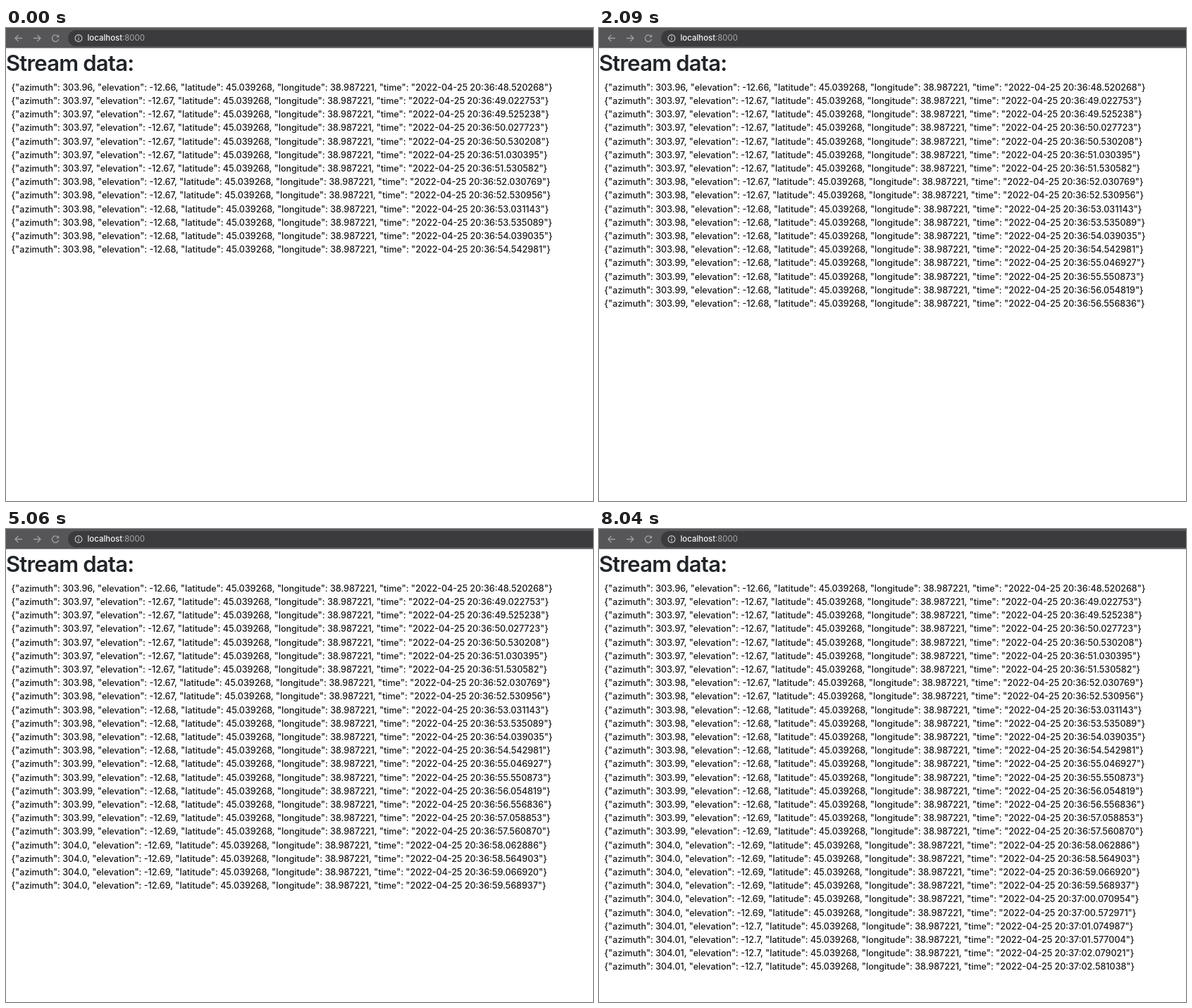
Recreate the animation shown at these times as an HTML page. Size 833 by 672 pixels, loop 9.24 s.

```html
<!DOCTYPE html>
<html lang="en">
<head>
<meta charset="utf-8">
<title>Stream data</title>
<style>
  html, body { margin: 0; width: 100%; height: 100%; overflow: hidden; background: #fff; }
  svg { display: block; font-family: Inter, Roboto, sans-serif; font-optical-sizing: none; }
  .icon { fill: none; stroke: #a09fa2; stroke-width: 1.3; }
  .url { font-size: 11.4px; font-weight: 500; fill: #f4f4f5; }
  .port { font-weight: 400; fill: #a9a8ab; }
  .heading { font-size: 31px; font-weight: 600; letter-spacing: -0.8px; fill: #212529; }
  #rows { font-size: 12.52px; font-weight: 500; fill: #18191c; }
</style>
</head>
<body>
<svg width="833" height="672" viewBox="0 0 833 672">
  <rect width="833" height="28.5" fill="#565558"/>
  <rect x="88" y="3" width="780" height="23" rx="11.5" fill="#3b3a3d"/>
  <g class="icon">
    <path d="M23 14.5H13M17.5 10L13 14.5L17.5 19"/>
    <path d="M39 14.5H49M44.5 10L49 14.5L44.5 19"/>
    <path d="M73.6 11.4A4.7 4.7 0 1 0 74.7 15.8"/>
    <path d="M75.2 9.3V13.3H71.2Z" fill="#a09fa2" stroke="none"/>
    <g stroke="#d0cfd1" stroke-width="1.1">
      <circle cx="103" cy="14.5" r="4.9"/>
      <path d="M103 13.8V17.2M103 11.6V12.8"/>
    </g>
  </g>
  <text class="url" x="115.5" y="18.4">localhost<tspan class="port">:8000</tspan></text>
  <text class="heading" x="0" y="61">Stream data:</text>
  <g id="rows"></g>
  <path id="pointer" d="M831.5 556.5V567.5L834 565.3L838 563Z" fill="#222"/>
</svg>
<script>
const LOOP = 9240;
const TICK = 148.8;            // the screen refreshes in steps of this many ms
const TICKS_PER_ROW = 3.36;
const FIRST_ARRIVAL = 4;       // in ticks
const INITIAL_ROWS = 13;
const ROW_COUNT = 29;
const ROW_HEIGHT = 19.2;

// [row, seconds after 20:36:00]; the sampling rate drifts slightly between these.
const clockPoints = [[0, 48.520268], [4, 50.530208], [9, 53.031143],
                     [15, 56.054819], [28, 62.581038]];

function secondsAt(row) {
  const next = Math.max(1, clockPoints.findIndex(([index]) => index >= row));
  const [i0, s0] = clockPoints[next - 1];
  const [i1, s1] = clockPoints[next];
  return s0 + (s1 - s0) * (row - i0) / (i1 - i0);
}

function timestamp(row) {
  const seconds = secondsAt(row);
  const minutes = 36 + Math.floor(seconds / 60);
  return `2022-04-25 20:${minutes}:${(seconds % 60).toFixed(6).padStart(9, "0")}`;
}

// Two decimals without a trailing zero, but always at least one decimal.
const formatFloat = hundredths => (hundredths / 100).toFixed(2).replace(/0$/, "");

function record(row) {
  const azimuth = formatFloat(30396 + Math.ceil(row / 6));
  const elevation = formatFloat(-1266 - Math.ceil(row / 8));
  return `{"azimuth": ${azimuth}, "elevation": ${elevation}, "latitude": 45.039268, ` +
    `"longitude": 38.987221, "time": "${timestamp(row)}"}`;
}

function arrivalTick(row) {
  const waited = row - INITIAL_ROWS;
  return waited < 0 ? 0 : Math.floor(FIRST_ARRIVAL + waited * TICKS_PER_ROW);
}

const rows = Array.from({ length: ROW_COUNT }, (_, i) => {
  const row = document.createElementNS("http://www.w3.org/2000/svg", "text");
  row.setAttribute("x", 7.6);
  row.setAttribute("y", 88.8 + i * ROW_HEIGHT);
  row.textContent = record(i);
  document.getElementById("rows").append(row);
  return row;
});
const pointer = document.getElementById("pointer");

const show = (element, visible) => { element.style.display = visible ? "" : "none"; };

function draw() {
  const tick = Math.floor(performance.now() % LOOP / TICK);
  rows.forEach((row, i) => show(row, tick >= arrivalTick(i)));
  show(pointer, tick === 48);
  requestAnimationFrame(draw);
}
draw();
</script>
</body>
</html>
```
